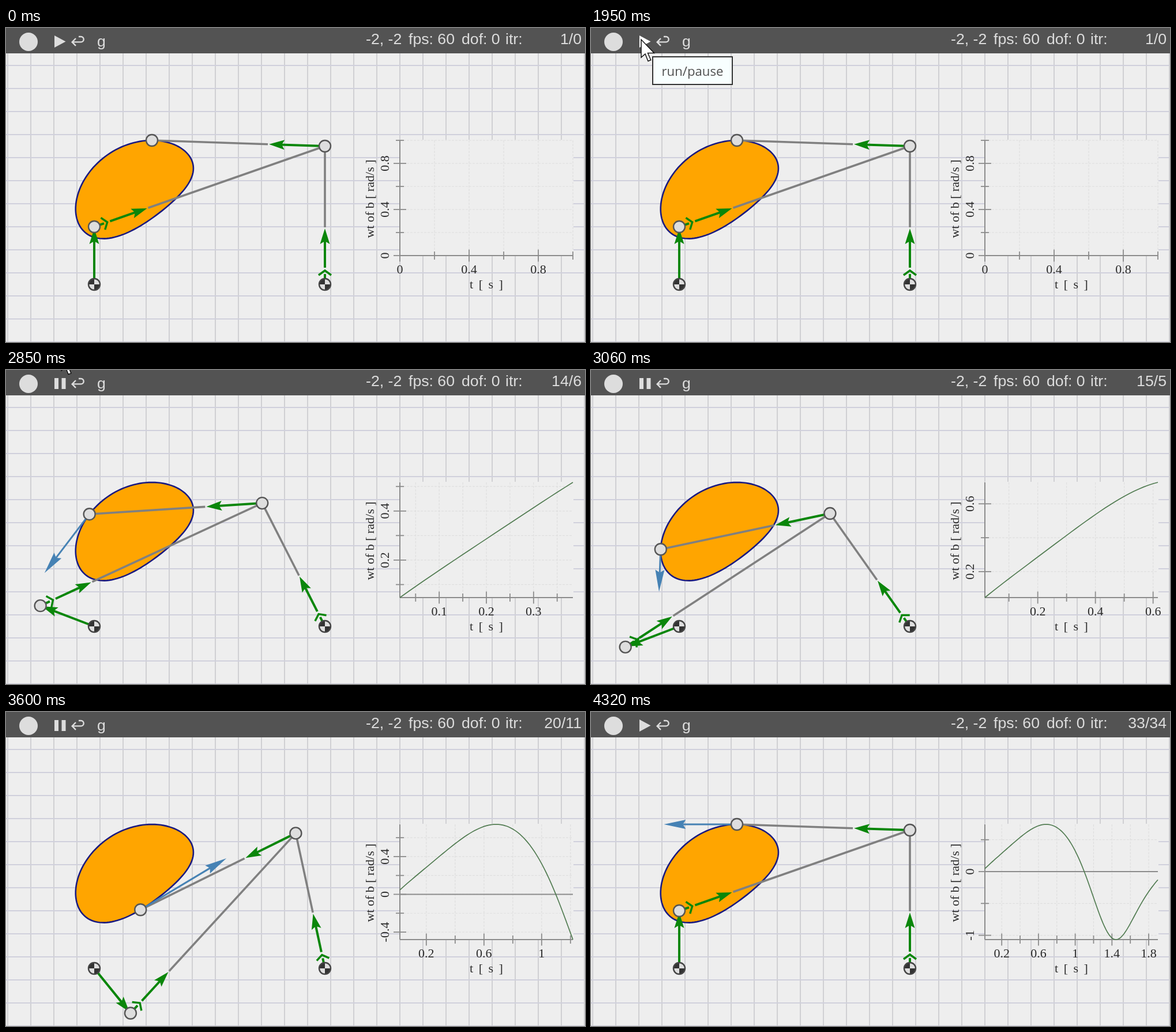
An HTML page with a canvas that plays this animation: 1004 px wide and 545 px high, repeating every 5100 ms.

```html
<!DOCTYPE html>
<html lang="en">
<head>
<meta charset="utf-8">
<title>Four-bar linkage</title>
<style>
  html, body { margin: 0; width: 100%; height: 100%; overflow: hidden; background: #eee; }
  canvas, svg, header, #tip { position: absolute; left: 0; top: 0; }
  header { width: 1004px; height: 44px; background: #535353; color: #ddd;
           font: 26.67px/30px "Liberation Sans", Arial, sans-serif; }
  header span { position: absolute; top: 4px; white-space: pre; }
  header svg { fill: #ddd; }
  #button.hover { fill: #fff; }
  #tip { left: 106px; top: 49px; width: 140px; height: 50px; box-sizing: border-box;
         border: 2px solid #333; background: #f8ffff; color: #505050; text-align: center;
         font: 22.2px/47px "Open Sans", sans-serif; }
</style>
</head>
<body>
<canvas id="stage" width="1004" height="545"></canvas>
<header>
  <svg width="160" height="44">
    <circle cx="39" cy="24" r="16"/>
    <path id="button"/>
    <path d="M126 15h4a4.7 4.7 0 0 1 0 9.4H115M121 18l-6.3 6.4 6.3 6.4" fill="none" stroke="#ddd" stroke-width="2.4"/>
  </svg>
  <span style="left:158px;top:8px">g</span>
  <span style="left:624px">-2, -2</span>
  <span style="left:698px">fps: 60</span>
  <span style="left:790px">dof: 0</span>
  <span style="left:866px">itr:</span>
  <span id="count" style="right:6px"></span>
</header>
<div id="tip">run/pause</div>
<svg id="cursor" width="30" height="44" style="overflow:visible">
  <path d="M0 0V31L7 25 12 37.5 16.7 35.5 11.5 23.5H22.5Z" fill="#fff" stroke="#111" stroke-width="1.5"/>
</svg>
<script>
const LOOP = 5100, STEP = 30, START = 2460, STOP = 4320;
const TAU = 2 * Math.PI, GREEN = '#0a860a', BLUE = '#4682b4', GRAY = '#808080';
const $ = id => document.getElementById(id);
const g = $('stage').getContext('2d');

// ---- linkage ----
const A0 = { x: 153, y: 445 }, B0 = { x: 553, y: 445 };
const CRANK = 100, ROCKER = 240, COUPLER = Math.hypot(400, 140);
const PHI0 = Math.atan2(140, 400);

// Pose after n simulation steps of 1/60 s, the crank turns 3 degrees per step.
function pose(n) {
  const turn = n * Math.PI / 60;
  const A = { x: A0.x - CRANK * Math.sin(turn), y: A0.y - CRANK * Math.cos(turn) };
  const dx = B0.x - A.x, dy = A.y - B0.y, d = Math.hypot(dx, dy);
  const phi = Math.atan2(dy, dx) +
    Math.acos((d * d + COUPLER * COUPLER - ROCKER * ROCKER) / (2 * d * COUPLER));
  const B = { x: A.x + COUPLER * Math.cos(phi), y: A.y - COUPLER * Math.sin(phi) };
  const c = Math.cos(phi - PHI0), s = Math.sin(phi - PHI0);
  const C = { x: A.x + 100 * c - 150 * s, y: A.y - 100 * s - 150 * c };
  return { A, B, C, phi };
}
const omega = n => (pose(n + .05).phi - pose(n - .05).phi) * 600;

const orbit = new Path2D();
for (let n = 0; n < 120; n++) {
  const { C } = pose(n);
  orbit.lineTo(C.x, C.y);
}
orbit.closePath();

// ---- drawing helpers ----
function line(x1, y1, x2, y2, color, width) {
  g.strokeStyle = color;
  g.lineWidth = width;
  g.beginPath();
  g.moveTo(x1, y1);
  g.lineTo(x2, y2);
  g.stroke();
}

function along(p, q, draw) {
  g.save();
  g.translate(p.x, p.y);
  g.rotate(Math.atan2(q.y - p.y, q.x - p.x));
  draw(Math.hypot(q.x - p.x, q.y - p.y));
  g.restore();
}

function head(tip, length, half, color) {
  g.fillStyle = color;
  g.beginPath();
  g.moveTo(tip, 0);
  g.lineTo(tip - length, -half);
  g.lineTo(tip - length + 5, 0);
  g.lineTo(tip - length, half);
  g.fill();
}

function link(p, q, driven) {
  along(p, q, length => {
    if (length > 101) line(99, 0, length, 0, GRAY, 3.6);
    if (driven) {
      line(0, 0, 18, 0, GREEN, 4);
      line(29, 0, 78, 0, GREEN, 4);
      g.lineWidth = 3.5;
      g.beginPath();
      g.moveTo(16, -11);
      g.lineTo(24, 0);
      g.lineTo(16, 11);
      g.stroke();
    } else line(0, 0, 78, 0, GREEN, 4);
    head(97, 27, 8.5, GREEN);
  });
}

function velocity(n) {
  const p = pose(n - .05).C, q = pose(n + .05).C, C = pose(n).C;
  const speed = Math.hypot(q.x - p.x, q.y - p.y) * 600;
  const v = Math.min(100, Math.max(25, speed * .2));
  const length = 125 + 75 * Math.tanh(((v - 25) / 75 - .5) * 5);
  along(C, { x: C.x + q.x - p.x, y: C.y + q.y - p.y }, () => {
    line(0, 0, length - 33, 0, BLUE, 3);
    head(length, 38, 8, BLUE);
  });
}

function node({ x, y }, fixed) {
  g.beginPath();
  g.arc(x, y, 10, 0, TAU);
  g.fillStyle = '#dedede';
  g.fill();
  if (fixed) {
    g.fillStyle = '#333';
    for (const from of [0, Math.PI]) {
      g.beginPath();
      g.moveTo(x, y);
      g.arc(x, y, 10, from, from + Math.PI / 2);
      g.fill();
    }
  }
  g.beginPath();
  g.arc(x, y, 10, 0, TAU);
  g.strokeStyle = fixed ? '#444' : '#555';
  g.lineWidth = 2.4;
  g.stroke();
}

function label(text, x, y, upright, spacing = 0) {
  g.save();
  g.translate(x, y);
  if (!upright) g.rotate(-Math.PI / 2);
  g.letterSpacing = spacing + 'px';
  g.fillText(text, 0, 0);
  g.restore();
}

// ---- chart ----
const BOX = { left: 683, right: 983, top: 195, bottom: 395 };

function ticks(min, max, size) {
  const least = 31 * (max - min) / size;
  const power = 10 ** Math.floor(Math.log10(least));
  const base = [1, 2, 5, 10].find(b => b * power >= least);
  const step = base * power, list = [];
  const odd = base === 2 && min > 0 ? 1 : 0;
  for (let i = Math.ceil(min / step - 1e-6); i <= max / step + 1e-6; i++)
    list.push({ value: i * step, major: Math.abs(i % 2) === odd, text: String(+(i * step).toFixed(3)) });
  return list;
}

function chart(n) {
  const { left, right, top, bottom } = BOX;
  const last = Math.min(n, 114), live = last > 1, data = [];
  for (let i = 1; live && i <= last; i++) data.push(omega(i + 1));
  const t0 = live ? 1 / 60 : 0, t1 = live ? last / 60 : 1;
  const w0 = live ? Math.min(...data) : 0, w1 = live ? Math.max(...data) : 1;
  const px = t => left + (t - t0) / (t1 - t0) * (right - left);
  const py = w => bottom - (w - w0) / (w1 - w0) * (bottom - top);
  const xs = ticks(t0, t1, right - left), ys = ticks(w0, w1, bottom - top);

  g.fillStyle = '#eee';
  g.fillRect(left, top - 1, right - left + 1, bottom - top + 1);
  g.setLineDash([4, 2]);
  for (const { value } of xs) line(px(value), top, px(value), bottom, '#dfdfdf', 1.2);
  for (const { value } of ys) line(left, py(value), right, py(value), '#dfdfdf', 1.2);
  g.setLineDash([]);

  line(left, top, left, bottom, '#8c8c8c', 2);
  line(left, bottom, right, bottom, '#8c8c8c', 2);
  if (w0 < 0) line(left, py(0), right, py(0), '#8c8c8c', 2);

  g.font = '22px "Liberation Serif", "Times New Roman", serif';
  g.textAlign = 'center';
  for (const { value, major, text } of xs) {
    const x = px(value), reach = major ? 10.5 : 7;
    line(x, bottom - reach, x, bottom + reach, '#8c8c8c', 1.8);
    g.fillStyle = '#2a2a2a';
    if (major) label(text, x, 426, true);
  }
  for (const { value, major, text } of ys) {
    const y = py(value), reach = major ? 11 : 7;
    line(left - reach, y, left + reach, y, '#8c8c8c', 1.8);
    g.fillStyle = '#2a2a2a';
    if (major) label(text, 664, y, false);
  }
  label('t [ s ]', 834, 452, true, 2);
  label('wt of b [ rad/s ]', 638, 296.5, false);

  g.strokeStyle = '#527c52';
  g.lineWidth = 1.7;
  g.beginPath();
  data.forEach((w, i) => g.lineTo(px((i + 1) / 60), py(w)));
  g.stroke();
}

// ---- timeline ----
// Piecewise linear track through points [time, ...values].
function track(points, t) {
  const k = points.findIndex(p => p[0] > t);
  if (k === 0) return points[0].slice(1);
  if (k < 0) return points[points.length - 1].slice(1);
  const a = points[k - 1], b = points[k], f = (t - a[0]) / (b[0] - a[0]);
  return a.slice(1).map((v, i) => v + f * (b[i + 1] - v));
}

const MOUSE = [[660, 121, -32], [1170, 95, -10], [1350, 88, 8], [1530, 86, 18], [1709, 86, 18],
               [1710, 87, 20], [2700, 87, 20], [2880, 98, -40]];
const COUNTS = [[0, 1, 0], [8, 13, 8], [37, 15, 5], [73, 20, 11], [93, 31, 14], [120, 33, 34]];

function stepsAt(t) {
  if (t < 2520) return 0;
  return Math.min(120, (t - 2520) / 15 + (t >= 2850 ? 1 : 0));
}

function drawStage(n) {
  g.fillStyle = '#eee';
  g.fillRect(0, 0, 1004, 545);
  for (let x = 3; x < 1004; x += 40) line(x, 44, x, 545, '#d0d0d3', 2);
  for (let y = 65; y <= 545; y += 40) line(0, y, 1002, y, '#d0d0dc', 2);
  chart(n);

  g.fillStyle = '#ffa500';
  g.fill(orbit);
  g.strokeStyle = '#1a1a80';
  g.lineWidth = 2.6;
  g.stroke(orbit);

  const { A, B, C } = pose(n);
  link(A0, A, false);
  link(A, B, true);
  link(B0, B, true);
  link(B, C, false);
  if (n > 0) velocity(n);
  node(A0, true);
  node(B0, true);
  [A, B, C].forEach(p => node(p, false));
}

let shown = -1;
function frame(now) {
  const t = Math.floor(now % LOOP / STEP) * STEP;
  if (t !== shown) {
    shown = t;
    const n = stepsAt(t), [x, y] = track(MOUSE, t);
    drawStage(n);
    $('count').textContent = track(COUNTS, n).map(Math.round).join('/');
    $('button').setAttribute('d', t >= START && t < STOP
      ? 'M84 14h7v19h-7zM96.500 14h7v19h-7z' : 'M84 13L103.500 23.500 84 34z');
    $('button').classList.toggle('hover', y > 5);
    $('cursor').style.transform = `translate(${x}px, ${y}px)`;
    $('cursor').style.display = t >= 660 && t < 2880 ? '' : 'none';
    $('tip').style.display = t >= 1950 && t < START ? '' : 'none';
  }
  requestAnimationFrame(frame);
}
frame(0);
</script>
</body>
</html>
```
